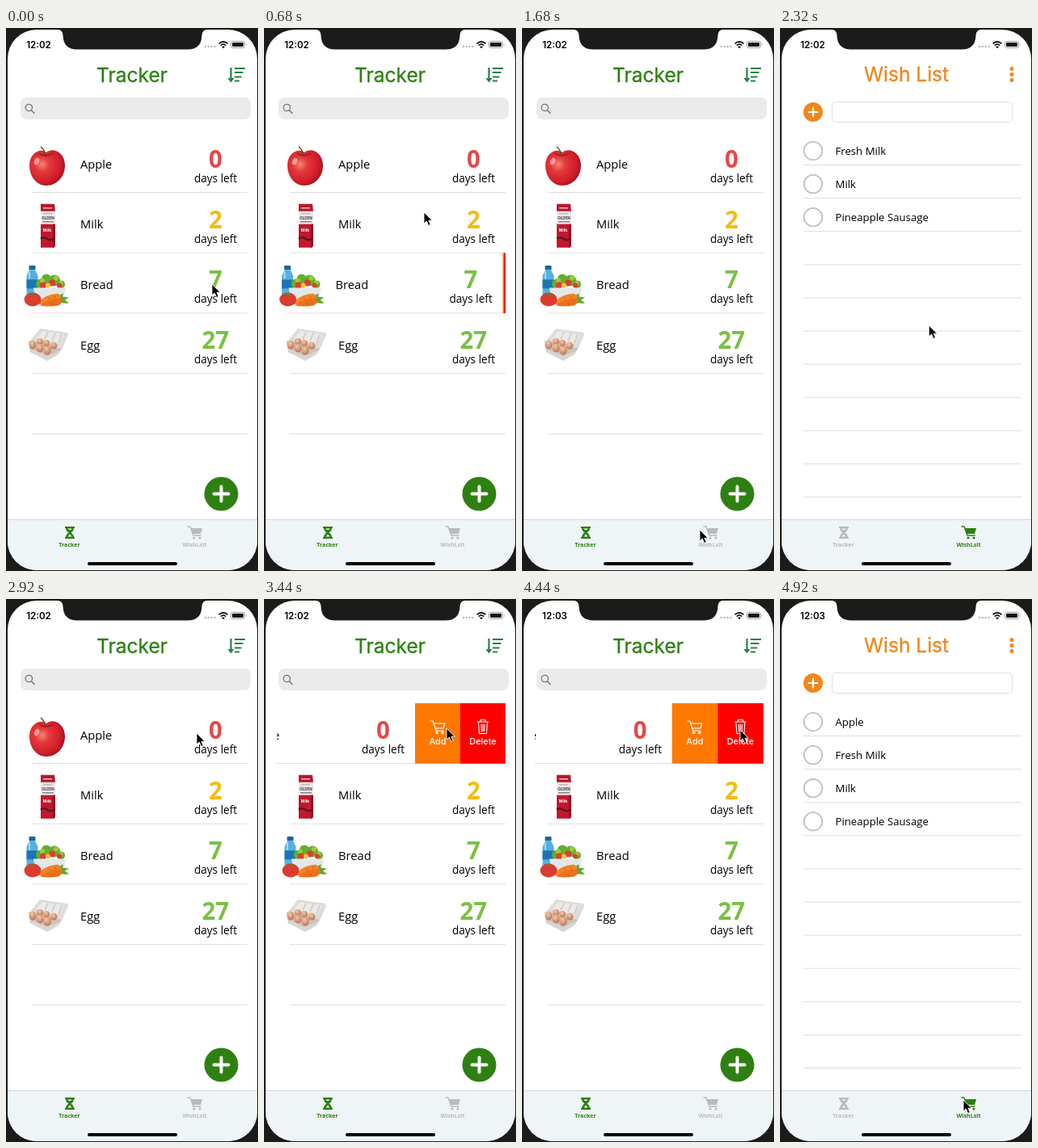
Write an HTML page that moves like this. It is 312x672 px and loops after 4960 ms.

```html
<!DOCTYPE html>
<html lang="en">
<head>
<meta charset="utf-8">
<title>Tracker</title>
<style>
  html, body { margin: 0; width: 100%; height: 100%; overflow: hidden; background: #1b1b1b; }
  svg { display: block; width: 312px; height: 672px; }
  text { font-family: "Open Sans", sans-serif; fill: #000; }
  .ui { font-family: Inter, sans-serif; }
  .title { font: 400 24.5px Inter, sans-serif; stroke-width: .35; stroke-linejoin: round; }
  .name { font-size: 14.7px; }
  .count { font-size: 29.5px; font-weight: 700; }
  .left { font-size: 13.6px; }
  .wish { font-size: 13.2px; }
  .tab { font-size: 7.1px; font-weight: 700; fill: inherit; }
  .mid { text-anchor: middle; }
  .line { stroke: #dedede; }
</style>
</head>
<body>
<svg viewBox="0 0 312 672">
  <defs>
    <clipPath id="screen"><rect x="2" y="2" width="309" height="669" rx="36"/></clipPath>
    <clipPath id="list"><rect x="16" y="120" width="283" height="488"/></clipPath>
    <radialGradient id="skin" cx=".36" cy=".4" r=".68">
      <stop offset="0" stop-color="#f58673"/><stop offset=".3" stop-color="#e4393a"/><stop offset=".75" stop-color="#cf1d2a"/><stop offset="1" stop-color="#a50d1d"/>
    </radialGradient>
    <radialGradient id="shell" cx=".4" cy=".3" r=".7">
      <stop offset="0" stop-color="#f3c9ac"/><stop offset="1" stop-color="#bd7652"/>
    </radialGradient>

    <g id="apple">
      <path d="M50 25C43 19 29 25 29 41C29 55 38 66 50 66C63 66 73 55 73 41C73 25 58 18 50 25Z" fill="url(#skin)"/>
      <path d="M41 26Q49 32 58 26" fill="none" stroke="#9c1f1c" stroke-width="1.8"/>
      <path d="M49 29Q48 22 43 18" fill="none" stroke="#6b4426" stroke-width="1.6"/>
      <ellipse cx="38" cy="36" rx="3" ry="4.500" fill="#fff" opacity=".45" transform="rotate(25 38 36)"/>
    </g>

    <g id="milk">
      <path d="M43 14H60L61 25V67L59 68H43Z" fill="#eee9ea"/>
      <path d="M43 14H60L61 23H43Z" fill="#b5192b"/>
      <path d="M46 19H57" stroke="#eeb9be" stroke-width="1.600"/>
      <path d="M46 26H57" stroke="#c9c2c5" stroke-width="2"/>
      <text class="ui mid" x="52" y="33" font-size="4.500" font-weight="700" style="fill:#333">OLDEN</text>
      <path d="M45 36H59" stroke="#888" stroke-width="1.400"/>
      <path d="M43 39H61V66L59 68H43Z" fill="#c2172d"/>
      <path d="M58 39H61V66L59 68H58Z" fill="#921022"/>
      <text class="ui mid" x="51" y="48" font-size="5" font-weight="700" style="fill:#fff">Milk</text>
      <path d="M43 57q4-3 8 0t9 0" fill="none" stroke="#5d1520" stroke-width="2.500"/>
    </g>

    <g id="bread">
      <rect x="28.500" y="15.500" width="8" height="5.500" rx="1" fill="#15679e"/>
      <path d="M29 21H36L39.500 28V54H25.500V28Z" fill="#55b0e0"/>
      <path d="M25.500 33H39.500V44H25.500Z" fill="#1b75b4"/>
      <path d="M29 23V32" stroke="#a4daf4" stroke-width="2"/>
      <g fill="#63ad2f"><circle cx="43" cy="38" r="6"/><circle cx="50" cy="32" r="6"/><circle cx="60" cy="34" r="7"/><circle cx="68" cy="39" r="5"/></g>
      <g fill="#9ccc3a"><circle cx="45" cy="34" r="3"/><circle cx="62" cy="31" r="3"/><circle cx="68" cy="37" r="2.500"/></g>
      <g fill="#df3b34"><circle cx="46" cy="40" r="4"/><circle cx="57" cy="37" r="4"/><circle cx="66" cy="40" r="3"/></g>
      <circle cx="52" cy="40" r="3" fill="#f5bf30"/>
      <path d="M34 43H74Q73 63 54 64Q36 63 34 43Z" fill="#e4e7e9"/>
      <path d="M64 57Q66 51 71 50L70 54L78 55L73 58L78 62Q69 63 64 60Z" fill="#61a738"/>
      <path d="M40 63Q45 52 64 50Q71 53 66 59Q53 67 40 63Z" fill="#f18423"/>
      <path d="M42 65Q53 56 67 56Q73 60 65 65Q52 67 42 65Z" fill="#ea711b"/>
      <path d="M52 55l3 3M60 53l2 3M56 62l3 2" stroke="#c45a10"/>
      <ellipse cx="33" cy="57.500" rx="10.500" ry="8.500" fill="#dc3c2f"/>
      <path d="M28 50l5 1 4-2-2 4-3-1Z" fill="#4d8e2d"/>
    </g>

    <g id="egg">
      <path d="M42 19L76 24L77 27L69 45L30 34Z" fill="#dedbd9"/>
      <path d="M45 22L72 26L66 38L37 31Z" fill="#eceae8"/>
      <path d="M52 23l-4 9M61 24l-4 10M69 26l-4 11" stroke="#d2cecb" stroke-width="2"/>
      <path d="M28 34L69 44L66 49L51 58L30 48Z" fill="#c9c3bf"/>
      <g fill="url(#shell)"><ellipse cx="42" cy="35" rx="4" ry="4"/><ellipse cx="50" cy="37" rx="4" ry="4"/><ellipse cx="59" cy="40" rx="4.500" ry="4.500"/><ellipse cx="33" cy="39" rx="4.500" ry="5.500"/><ellipse cx="42" cy="43" rx="4.500" ry="5.500"/><ellipse cx="51" cy="46" rx="4.800" ry="5.500"/></g>
      <path d="M29 44L38 47L51 53L67 46L65 51L51 59L32 49Z" fill="#d8d5d2"/>
    </g>

    <g id="cart" stroke-linecap="round" stroke-linejoin="round">
      <path d="M-9-7H-6L-2 4H7" fill="none" stroke="currentColor" stroke-width="1.5"/>
      <path d="M-5-5H9L7 2H-3Z" fill="currentColor"/>
      <circle cx="-1" cy="7" r="1.6" fill="currentColor"/><circle cx="6" cy="7" r="1.6" fill="currentColor"/>
    </g>
    <g id="cartLine" fill="none" stroke="#fff" stroke-width="1.2" stroke-linecap="round" stroke-linejoin="round">
      <path d="M-9-7H-6L-2 5H7M-5-4H9L7 2H-3"/>
      <circle cx="-1" cy="7.5" r="1.2"/><circle cx="6" cy="7.5" r="1.2"/>
    </g>
    <path id="bin" d="M-7-6H7M-3-6V-8.5H3V-6M-5.5-6L-4.5 8.5H4.5L5.5-6M-2-3L-1.7 6M2-3L1.7 6M0-3V6" fill="none" stroke="#fff" stroke-width="1.1" stroke-linejoin="round"/>
  </defs>

  <rect width="312" height="672" fill="#1b1b1b"/>
  <g clip-path="url(#screen)">
    <rect width="312" height="672" fill="#fff"/>

    <g id="tracker">
      <text class="title mid" x="156" y="66.500" style="fill:#2d8113" stroke="#2d8113">Tracker</text>
      <g fill="none" stroke="#278048" stroke-width="2.200">
        <path d="M278.500 49V64"/>
        <path d="M283 50H296M283 55H293.500M283 60.500H291.500M283 65.500H289"/>
      </g>
      <path d="M274.500 62H282.500L278.500 67.500Z" fill="#278048"/>
      <rect x="18" y="86" width="285" height="27" rx="7.500" fill="#ebebeb"/>
      <path d="M31.500 102L35 105.500" stroke="#777" stroke-width="1.500" stroke-linecap="round"/>
      <circle cx="28.300" cy="98.500" r="4.200" fill="none" stroke="#777" stroke-width="1.300"/>
      <g id="rows" clip-path="url(#list)"></g>
      <circle cx="266.500" cy="576.500" r="21" fill="#2e8012"/>
      <path d="M257.500 576.500H275.500M266.500 567.500V585.500" stroke="#fff" stroke-width="4" stroke-linecap="round"/>
    </g>

    <g id="wishes">
      <text class="title mid" x="156.500" y="65.500" style="fill:#f0871d" stroke="#f0871d">Wish List</text>
      <g fill="#f0871d"><circle cx="287" cy="50.500" r="2.500"/><circle cx="287" cy="57.500" r="2.500"/><circle cx="287" cy="64.500" r="2.500"/><circle cx="41" cy="104" r="12"/></g>
      <path d="M35.500 104H46.500M41 98.500V109.500" stroke="#fff" stroke-width="2.200" stroke-linecap="round"/>
      <rect x="64.500" y="91.500" width="223" height="25" rx="4" fill="#fff" stroke="#e0e0e0"/>
      <g id="wishRows"></g>
    </g>

    <rect y="608" width="312" height="64" fill="#eff4f7"/>
    <path d="M0 608.500H312" stroke="#d3d7da"/>
    <g id="tabTracker">
      <path d="M73 617H85V619H84Q84 622 80.500 624.500Q84 627 84 630H85V632H73V630H74Q74 627 77.500 624.500Q74 622 74 619H73Z" fill="currentColor"/>
      <path d="M76.500 619.500H81.500L80.500 621H77.500ZM79 626.500L81.500 629.500H76.500Z" fill="#eff4f7"/>
      <text class="tab mid" x="78.500" y="642">Tracker</text>
    </g>
    <g id="tabWish">
      <use href="#cart" x="234" y="624"/>
      <text class="tab mid" x="233.500" y="642">WishLsit</text>
    </g>
    <rect x="101" y="661" width="111" height="4" rx="2" fill="#000"/>

    <path d="M64 0V2Q70 2 70.500 9Q71 26.500 88 26.500H225Q242 26.500 242.500 9Q243 2 249 2V0Z" fill="#1b1b1b"/>
    <text id="clock" class="ui mid" x="40.500" y="24.500" font-size="11.600" font-weight="600"></text>
    <g fill="#bbb"><circle cx="247" cy="23" r="1.300"/><circle cx="250.800" cy="23" r="1.300"/><circle cx="254.600" cy="23" r="1.300"/><circle cx="258.400" cy="23" r="1.300"/></g>
    <path d="M263.500 19.300Q269 14.700 274.500 19.300M265.700 21.600Q269 18.800 272.300 21.600" fill="none" stroke="#111" stroke-width="1.700"/>
    <path d="M267 23.200Q269 21.600 271 23.200L269 25.300Z" fill="#111"/>
    <rect x="278.500" y="16.500" width="17" height="8" rx="2.300" fill="none" stroke="#999"/>
    <rect x="280" y="18" width="14" height="5" rx="1.200" fill="#111"/>
    <path d="M297.300 19Q298.800 20.500 297.300 22Z" fill="#999"/>
  </g>
  <path id="cursor" d="M0 0V14L3.300 11L5.700 16.500L8.200 15.400L5.900 10.200H10.300Z" fill="#000" stroke="#fff" stroke-width=".9"/>
</svg>

<script>
const LOOP = 4960, ROW = 74.7, TOP = 129, RIGHT = 299;
const $ = id => document.getElementById(id);

const foods = [
  ['apple', 'Apple', 0, '#e5484a'],
  ['milk', 'Milk', 2, '#f4bc10'],
  ['bread', 'Bread', 7, '#7bc043'],
  ['egg', 'Egg', 27, '#7bc043']
];
const wishes = ['Apple', 'Fresh Milk', 'Milk', 'Pineapple Sausage'];

// Time, x and y of the pointer tip
const pointer = [
  [0, 255, 317], [60, 255, 317], [240, 175, 317], [360, 180, 315], [560, 198, 236],
  [680, 198, 228], [840, 252, 240], [1020, 165, 240], [1200, 214, 240], [1320, 214, 243],
  [1640, 220, 621], [1840, 220, 621], [2040, 200, 330], [2240, 200, 330], [2600, 78, 624],
  [2680, 78, 624], [2880, 236, 166], [2960, 236, 166], [3160, 150, 164], [3400, 226, 160],
  [3560, 226, 160], [3880, 266, 167], [4040, 266, 167], [4220, 180, 167], [4360, 270, 162],
  [4440, 270, 162], [4720, 227, 620], [LOOP, 227, 620]
];
// Time and leftward slide of each row
const slides = {
  bread: [[60, 0], [240, 80], [360, 112], [520, 112], [600, 34], [640, 11], [680, 3.5], [720, 0]],
  milk: [[860, 0], [1020, 87], [1100, 112], [1240, 112], [1320, 34], [1400, 4], [1440, 0]],
  apple: [[2960, 0], [3160, 86], [3240, 112], [3520, 112], [3600, 34], [3680, 4], [3720, 0],
          [4040, 0], [4220, 86], [4280, 112], [4440, 112], [4600, 299]]
};
const lift = [[4460, 0], [4640, ROW]];

const smooth = p => p * p * (3 - 2 * p);
const linear = p => p;

function at(table, t, ease = linear, col = 1) {
  const i = table.findIndex(k => k[0] > t);
  if (i < 0) return table[table.length - 1][col];
  if (i === 0) return table[0][col];
  const a = table[i - 1], b = table[i];
  return a[col] + (b[col] - a[col]) * ease((t - a[0]) / (b[0] - a[0]));
}

const action = (kind, color, icon, label) => `
  <g class="${kind}"><rect width="${RIGHT}" height="${ROW}" fill="${color}"/>
    <use href="#${icon}" x="28" y="29"/>
    <text class="ui mid" x="28" y="51" font-size="10.9" font-weight="500" style="fill:#fff">${label}</text></g>`;

const foodRow = ([id, name, days, color]) => `
  <g class="row"><g class="body">
    <use href="#${id}"/>
    <text class="name" x="92" y="44.6">${name}</text>
    <text class="count mid" x="259.3" y="44" style="fill:${color}">${days}</text>
    <text class="left mid" x="259.5" y="62">days left</text>
    <path class="line" d="M32 74.500H${RIGHT}"/>
  </g>
  ${action('add', '#ff7800', 'cartLine', 'Add')}${action('del', '#ff0000', 'bin', 'Delete')}</g>`;

$('rows').innerHTML = foods.map(foodRow).join('') +
  `<path class="line" id="blank" d="M32 ${TOP + 5 * ROW - .2}H${RIGHT}"/>`;

$('wishRows').innerHTML = Array.from({ length: 11 }, (_, i) =>
  `<path class="line" d="M29 ${169.5 + i * 41.1}H${RIGHT}"/>`).join('') +
  wishes.map(() => `<g class="item"><circle cx="41" cy="152" r="11.300" fill="#fff" stroke="#bdbdbd" stroke-width="1.600"/>
    <text class="wish" x="68.500" y="156.500"></text></g>`).join('');

const rows = [...document.querySelectorAll('.row')].map(el => ({
  el, body: el.querySelector('.body'), add: el.querySelector('.add'), del: el.querySelector('.del')
}));
const items = [...document.querySelectorAll('.item')];
const move = (el, x, y) => el.setAttribute('transform', `translate(${x} ${y})`);
const show = (el, on) => el.setAttribute('visibility', on ? 'visible' : 'hidden');

function paintTab(id, active) {
  const color = active ? '#2c8010' : '#b9bbbc';
  $(id).style.color = color;
  $(id).style.fill = color;
}

function draw(t) {
  const onWish = (t >= 1720 && t < 2640) || t >= 4760;
  $('tracker').style.display = onWish ? 'none' : '';
  $('wishes').style.display = onWish ? '' : 'none';
  paintTab('tabTracker', !onWish);
  paintTab('tabWish', onWish);
  $('clock').textContent = t < 4200 ? '12:02' : '12:03';

  const up = at(lift, t, smooth);
  rows.forEach((row, i) => {
    const table = slides[foods[i][0]];
    const d = table ? at(table, t) : 0;
    move(row.el, 0, TOP + i * ROW - (i ? up : 0));
    move(row.body, -d, 0);
    move(row.add, RIGHT - d, 0);
    move(row.del, RIGHT - d / 2, 0);
    show(row.add, d > 0);
    show(row.del, d > 0);
  });
  rows[0].el.style.display = up < ROW ? '' : 'none';
  move($('blank'), 0, -up);

  const list = t < 3520 ? wishes.slice(1) : wishes;
  items.forEach((el, i) => {
    el.style.display = i < list.length ? '' : 'none';
    move(el, 0, i * 41.1);
    el.lastElementChild.textContent = list[i] || '';
  });

  move($('cursor'), at(pointer, t, smooth, 1), at(pointer, t, smooth, 2));
}

const start = performance.now();
function tick() {
  draw((performance.now() - start) % LOOP);
  requestAnimationFrame(tick);
}
tick();
</script>
</body>
</html>
```
